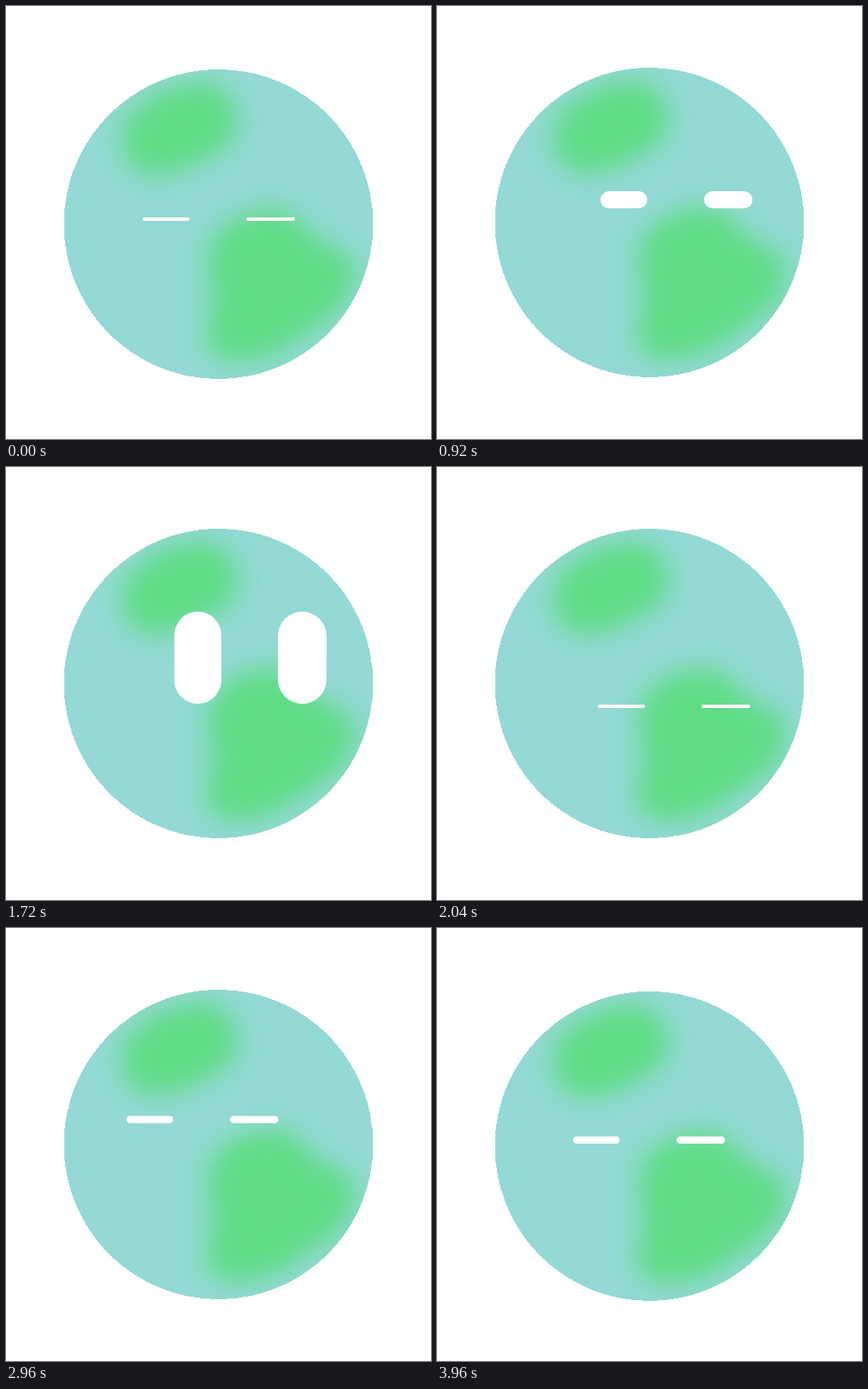
An HTML page for the animation above (4000 ms loop, 503 by 512 pixels).

```html
<!DOCTYPE html>
<html lang="en">
<head>
<meta charset="utf-8">
<title>Blinking planet</title>
<style>
  html, body { margin: 0; width: 100%; height: 100%; overflow: hidden; background: #fff; }
  svg { display: block; width: 100vw; height: 100vh; }
</style>
</head>
<body>
<svg viewBox="0 0 503 512">
  <defs>
    <clipPath id="disc"><circle cx="251.5" cy="256" r="183"/></clipPath>
    <filter id="soft" filterUnits="userSpaceOnUse" x="0" y="0" width="503" height="512"
            color-interpolation-filters="sRGB">
      <feGaussianBlur stdDeviation="16"/>
    </filter>
  </defs>
  <g id="planet">
    <circle cx="251.5" cy="256" r="183" fill="#94d9d6" shape-rendering="crispEdges"/>
    <g clip-path="url(#disc)">
      <g filter="url(#soft)" fill="#5fdc84">
        <path d="M137 162 Q136 127 168 108 Q205 86 240 88 Q272 98 276 136 Q272 164 238 178
                 Q205 197 176 199 Q142 196 137 162Z"/>
        <path d="M237 298 Q240 264 276 247 Q318 228 346 247 Q358 270 381 280 Q413 287 414 318
                 Q412 346 382 367 Q348 394 318 409 Q280 425 252 415 Q228 400 240 367
                 Q247 343 241 325Z"/>
      </g>
    </g>
  </g>
  <g fill="#fff">
    <rect id="left"/>
    <rect id="right"/>
  </g>
</svg>
<script>
  const LOOP = 4000, STEP = 40;
  const SHUT = 4, OPEN = 109, EYE_GAP = 123.6;
  const eyes = [
    { node: document.getElementById('left'), width: 55.5, offset: 0 },
    { node: document.getElementById('right'), width: 57.5, offset: EYE_GAP }
  ];
  const planet = document.getElementById('planet');

  // Each gaze opens from `start`, then shuts by `end` while sliding to the next one.
  const gazes = [
    { start: 0, opening: 520, end: 1000, x: 189.5, y: 252, lift: 3.5, bob: 2 },
    { start: 1040, opening: 520, end: 2040, x: 227, y: 225.5, lift: 0, bob: 0 },
    { start: 2200, opening: 400, end: 3000, x: 218.3, y: 283, lift: 0, bob: 0 },
    { start: 3000, opening: 520, end: 4000, x: 168, y: 224, lift: 0, bob: 0 }
  ];
  const CLOSING = 320;

  const mix = (a, b, p) => a + (b - a) * p;
  const ease = (t, from, length) => {
    const p = Math.min(1, Math.max(0, (t - from) / length));
    return p * p * (3 - 2 * p);
  };

  function pose(t) {
    const i = gazes.findLastIndex((g, k) => t >= (k ? gazes[k - 1].end : 0));
    const gaze = gazes[i], next = gazes[(i + 1) % gazes.length];
    const opened = ease(t, gaze.start, gaze.opening);
    const closed = ease(t, gaze.end - CLOSING, CLOSING);
    return {
      x: mix(gaze.x, next.x, closed),
      y: mix(gaze.y - gaze.lift * opened, next.y, closed),
      height: mix(SHUT, OPEN, opened * (1 - closed)),
      bob: mix(gaze.bob * (1 - opened), next.bob, closed)
    };
  }

  function draw(time) {
    const t = Math.floor((time % LOOP) / STEP) * STEP;
    const { x, y, height, bob } = pose(t);
    planet.setAttribute('transform', `translate(0 ${bob})`);
    for (const { node, width, offset } of eyes) {
      const radius = Math.min(width, height) / 2;
      const box = { x: x + offset - width / 2, y: y - height / 2, width, height, rx: radius, ry: radius };
      for (const key in box) node.setAttribute(key, box[key]);
    }
  }

  const began = performance.now();
  function tick() {
    draw(performance.now() - began);
    requestAnimationFrame(tick);
  }
  tick();
</script>
</body>
</html>
```
